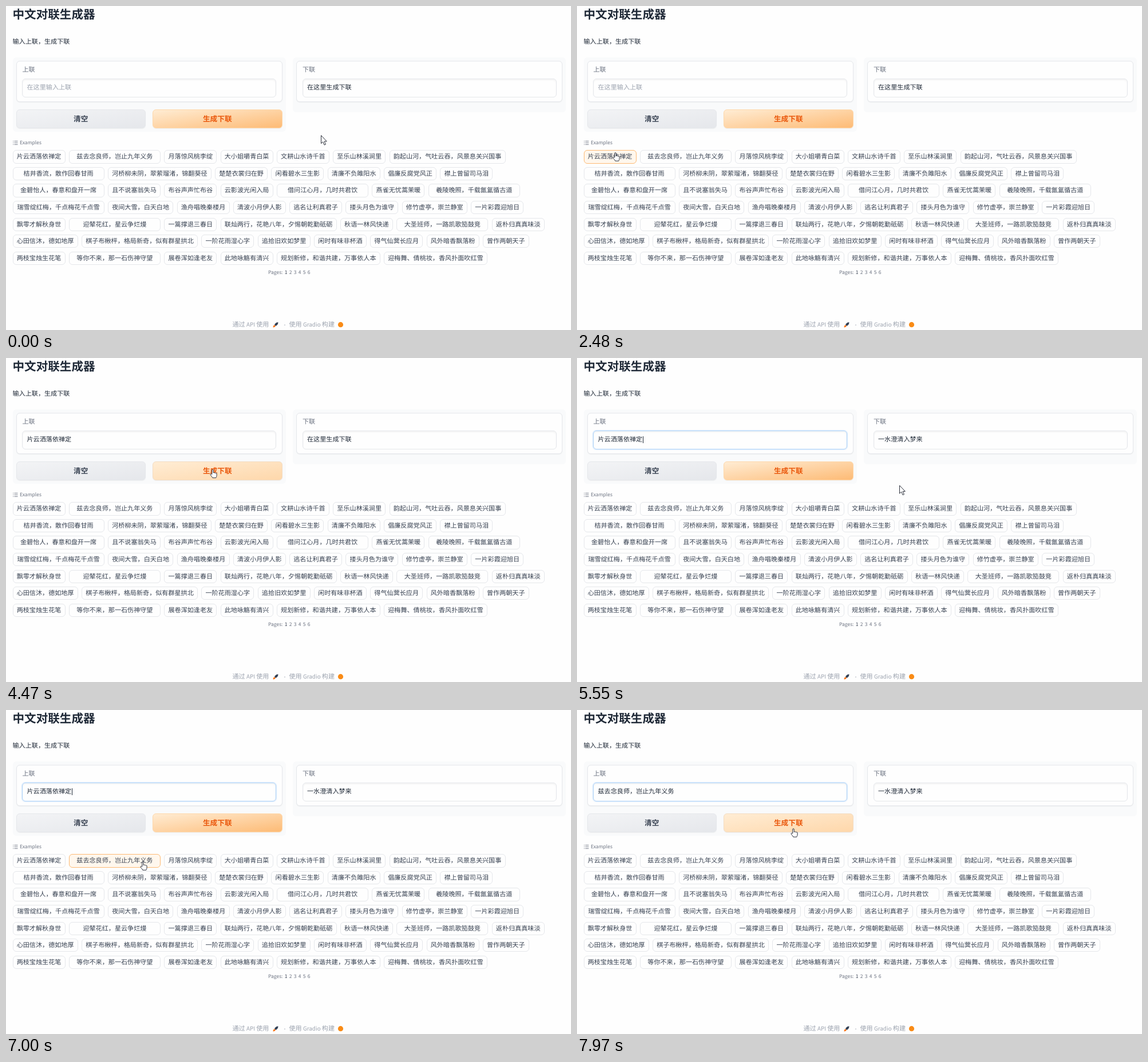
Recreate the animation shown at these times as an HTML page. Size 987 by 567 pixels, loop 8 s.

```html
<!DOCTYPE html>
<html lang="zh-CN">
<head>
<meta charset="utf-8">
<style>
html, body { margin: 0; width: 100%; height: 100%; overflow: hidden; background: #fefefe; }
#stage {
  position: relative; width: 987px; height: 567px; overflow: hidden; background: #fefefe;
  font-family: "Noto Sans CJK SC", "Noto Sans CJK", "Noto Sans", sans-serif;
  font-size: 11.1px; color: #1f2937; text-rendering: geometricPrecision;
}
#stage > * { position: absolute; box-sizing: border-box; white-space: pre; }
.text { line-height: 20px; }
.latin { font-size: .89em; }
.panel { background: #f9fafb; border-radius: 6px; }
.block { background: #fefefe; border: 1px solid #e5e7eb; border-radius: 6px; box-shadow: 0 1px 1px #0000000c; }
.field { background: #fefefe; border: 1px solid #e5e7eb; border-radius: 6px; box-shadow: inset 0 2px 3px #0000000b; }
.field.focus { border-color: #a9d0f8; box-shadow: 0 0 0 1.5px #eaf3fd, inset 0 2px 3px #0000000b; }
.button {
  border-radius: 6px; border: 1px solid #e5e7eb; text-align: center; font-size: 12.7px; font-weight: 700;
  line-height: 30px; box-shadow: 0 1px 1px #0000000c; background-origin: border-box;
}
.clear { color: #374151; background-image: linear-gradient(to bottom right, #f3f4f6, #e5e7eb); }
.run { color: #ea580c; border-color: #fed7aa; background-image: linear-gradient(to bottom right, #ffedd5, #fdba74); }
.run.hover { border-color: #f3dcc2; background-image: linear-gradient(to bottom right, #ffedd5, #fed7aa); }
.chip { border: 1px solid #e5e7eb; border-radius: 6px; color: #374151; text-align: center; line-height: 20px; background: #fefefe; }
.chip.hover { border-color: #fdba74; background: #fff7ed; }
#caret { background: #1f2937; }
svg { overflow: visible; left: 0; top: 0; }
</style>
</head>
<body>
<div id="stage"></div>
<script>
const LOOP = 8000;
const EM = 11.1, GAP = 6.3;
const stage = document.getElementById('stage');

function box(cls, x, y, w, h, text = '') {
  const el = document.createElement('div');
  el.className = cls;
  el.textContent = text;
  el.style.cssText = `left:${x}px;top:${y}px;width:${w}px;height:${h}px`;
  stage.append(el);
  return el;
}

// Places a line of text by its left edge and the middle of its glyphs.
function label(html, x, cy, color = '#1f2937', size = EM, weight = 400) {
  const el = document.createElement('div');
  el.className = 'text';
  el.innerHTML = html;
  el.style.cssText = `left:${x}px;top:${cy - 10 - size * .056}px;color:${color};font-size:${size}px;font-weight:${weight}`;
  stage.append(el);
  return el;
}

function drawing(markup) {
  const el = document.createElementNS('http://www.w3.org/2000/svg', 'svg');
  el.setAttribute('width', 1);
  el.setAttribute('height', 1);
  el.innerHTML = markup;
  stage.append(el);
  return el;
}

const grey = '#9ca3af', slate = '#6b7280';

label('中文对联生成器', 11.5, 14.5, '#1f2937', 20.6, 700);
label('输入上联，生成下联', 11.5, 62.5);

// Input and output columns share one layout.
const [input, output] = [['上联', 11.5, 130], ['下联', 501, 96]].map(([name, x, h]) => {
  box('panel', x, 90, 477, h);
  box('block', x + 6, 96, 465, 72);
  label(name, x + 17, 112, slate);
  return { field: box('field', x + 16.5, 126.5, 444, 33), text: label('', x + 25, 143) };
});
const caret = box('', 0, 137, 1, 12);
caret.id = 'caret';
const timer = label('', 0, 108, grey, 8);
timer.style.cssText += ';left:auto;right:23px;font-family:"Noto Sans Mono",monospace';

box('button clear', 17.5, 180.5, 226.5, 33.5, '清空');
const run = { x: 256, y: 180.5, w: 226.5, h: 33.5 };
run.el = box('button run', run.x, run.y, run.w, run.h, '生成下联');

for (const y of [236.5, 239.5, 242.5]) {
  drawing(`<path d="M12.2 ${y}h1.1m1.2 0h6" stroke="${slate}" stroke-width=".9"/>`);
}
label('Examples', 24, 239.7, slate, 8.5);

const rows = [
  '片云洒落依禅定 兹去念良师，岂止九年义务 月落惊风桃李绽 大小姐嚼青白菜 文耕山水诗千首 至乐山林溪涧里 韵起山河，气吐云吞，风景息关兴国事',
  '桔井香流，散作回春甘雨 河桥柳未阴，翠萦瑠渚，锦翻葵径 楚楚衣裳归在野 闲看碧水三生影 清廉不负雎阳水 倡廉反腐党风正 襟上曾留司马泪',
  '金碧怡人，春意和盘开一席 且不说塞翁失马 布谷声声忙布谷 云影波光闲入局 借问江心月，几时共君饮 燕雀无忧蒿茉暖 羲陵晚照，千载氤氲循古道',
  '瑞雪绽红梅，千点梅花千点雪 夜间大雪，白天白地 渔舟唱晚秦楼月 清波小月伊人影 逃名让利真君子 搂头月色为谁守 修竹虚亭，崇兰静室 一片彩霞迎旭日',
  '飘零才解秋身世 迎辇花红，星云争烂熳 一篙撑退三春日 联灿两行，花艳八年，夕惕朝乾勤砥砺 秋语一林风快递 大圣班师，一路凯歌笳鼓竞 返朴归真真味淡',
  '心田信沐，德如地厚 棋子布楸枰，格局新奇，似有群星拱北 一阶花雨湿心字 追拾旧欢如梦里 闲时有味非杯酒 得气仙蓂长应月 风外暗香飘落粉 曾作两朝天子',
  '两枝宝烛生花笔 等你不来，那一石伤神守望 展卷浑如逢老友 此地咏觞有清兴 规划新修，和谐共建，万事依人本 迎梅舞、倩桃妆，香风扑面吹红雪'
];
const targets = [run];
rows.forEach((row, i) => {
  let x = 11.5;
  const y = 252.3 + i * 29.55, h = 23.4;
  for (const text of row.split(' ')) {
    const fit = text.length * EM + 14.3;
    const w = text.length < 10 ? fit : Math.max(160.2, fit);
    targets.push({ el: box('chip', x, y, w, h, text), x, y, w, h });
    x += w + GAP;
  }
});

label('Pages:', 458, 466.5, slate, 8.5);
for (let n = 1; n <= 6; n++) {
  label(n, 478.8 + n * 8, 466.5, n === 1 ? '#374151' : slate, 8.5, n === 1 ? 500 : 400);
}

label('通过<span class="latin"> API </span>使用', 395.5, 558, grey);
label('使用<span class="latin"> Gradio </span>构建', 494.5, 558, grey);
drawing(`<circle cx="487" cy="558.3" r=".8" fill="${grey}"/>
  <path d="M475.5 553.5C472 553.5 470 555.5 469 558L471 560C473.5 559 475.5 557 475.5 553.5Z" fill="#334155"/>
  <path d="M469 558.3L470.8 560.1Q470 562.5 466.5 562.5Q466.5 559 469 558.3Z" fill="#f97316"/>
  <circle cx="584.5" cy="557.7" r="4.6" fill="#f98b16"/>`);

const shape = d => drawing(`<path d="${d}" fill="#fff" stroke="#2b2f3a" stroke-linejoin="round"/>`);
const arrow = shape('M.5 .5V14.6L3.7 11.7 6.1 17.2 8.4 16.2 6.1 10.9H10.3Z');
const hand = shape('M-1.2 8.5V1.4a1.2 1.2 0 0 1 2.4 0V6c.4-.9 2-.8 2.2.3.5-.8 2-.6 2.1.4.6-.7 1.6-.3 1.6.7V10.5c0 2-1 2.6-1.3 4.2H-.2C-.8 13-2.6 11.5-3.8 9.4c-.7-1.2.9-2 1.6-1.2z');

// Pointer moves: start, end, goal
const home = [550, 226];
const moves = [
  [1490, 2280, 67, 256.5],
  [3400, 4050, 361, 195],
  [4740, 5050, 563, 222.5],
  [5570, 6400, 239, 265.5],
  [7300, 7970, 378, 207.5]
];

// Each move eases along a shallow arc: sideways first, then up or down.
function pointer(t) {
  let [x, y] = home;
  for (const [start, end, toX, toY] of moves) {
    const s = Math.min(1, Math.max(0, (t - start) / (end - start)));
    const k = (s * s * (3 - 2 * s)) ** 1.25;
    x += (toX - x) * k;
    y += (toY - y) * k * k;
  }
  return [x, y];
}

// Value of the last step whose time has come.
const at = (steps, t) => steps.filter(s => s[0] <= t).pop()[1];
const typed = [[0, ''], [3110, '片云洒落依禅定'], [7180, '兹去念良师，岂止九年义务']];
const answer = [[0, '在这里生成下联'], [4800, '一水澄清入梦来']];
const focusSpans = [[3110, 4380], [4510, 7040], [7110, LOOP]];

function render(t) {
  const [x, y] = pointer(t);
  let over = false;
  for (const a of targets) {
    const hit = x >= a.x && x <= a.x + a.w && y >= a.y && y <= a.y + a.h;
    a.el.classList.toggle('hover', hit);
    over = over || hit;
  }
  arrow.style.display = over ? 'none' : '';
  hand.style.display = over ? '' : 'none';
  (over ? hand : arrow).style.transform = `translate(${x}px,${y}px)`;

  const value = at(typed, t);
  input.text.textContent = value || '在这里输入上联';
  input.text.style.color = value ? '#1f2937' : grey;
  output.text.textContent = at(answer, t);

  const span = focusSpans.find(([from, to]) => t >= from && t < to);
  input.field.classList.toggle('focus', !!span);
  caret.style.display = span && Math.floor((t - span[0]) / 520) % 2 === 0 ? '' : 'none';
  caret.style.left = 36.8 + value.length * EM + 'px';
  timer.textContent = t >= 4550 && t < 4800 ? ((t - 4500) / 1000).toFixed(1) + 's' : '';
}

function tick() {
  render(performance.now() % LOOP);
  requestAnimationFrame(tick);
}
tick();
</script>
</body>
</html>
```
